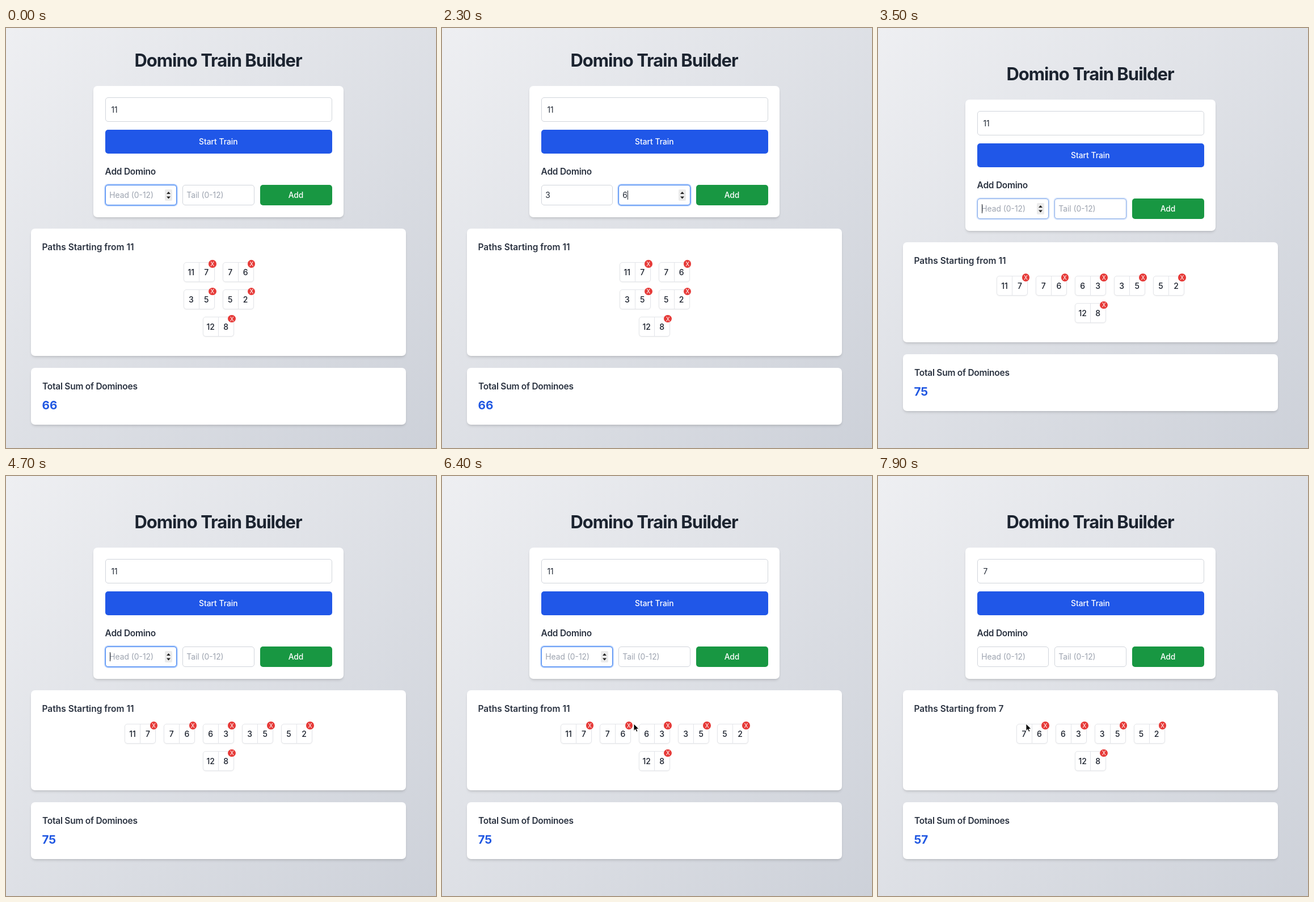
An HTML page that plays this animation: 758 px wide and 739 px high, repeating every 8 s.

```html
<!DOCTYPE html>
<html lang="en">
<head>
<meta charset="utf-8">
<title>Domino Train Builder</title>
<style>
html, body { margin: 0; width: 100%; height: 100%; overflow: hidden; }
#stage {
  position: relative; width: 758px; height: 739px; overflow: hidden;
  background: linear-gradient(to bottom right, #eeeff2, #cdd1d9);
  font: 400 13.8px Inter, "Noto Sans", sans-serif; color: #1f2733;
}
#stage div, #stage svg { position: absolute; box-sizing: border-box; }
.text { white-space: pre; line-height: 20px; }
.mid { transform: translateX(-50%); }
.title { font-size: 31px; font-weight: 700; letter-spacing: -1px; color: #1c2430; }
.head { font-size: 15.5px; font-weight: 600; color: #2a3240; }
.tight { letter-spacing: -.25px; }
.sum { font-size: 20.7px; font-weight: 700; color: #2158e2; }
.label { font-weight: 500; color: #fff; }
.hint { color: #9ca3af; }
.num { font-size: 14px; font-weight: 500; color: #1a202c; }
.x { font-size: 10.3px; color: #fff; }
.card {
  background: #fff; border-radius: 7px;
  box-shadow: 0 3.5px 5px -1px rgba(0,0,0,.1), 0 2px 3.5px -1.5px rgba(0,0,0,.1);
}
.field { background: #fff; border: 1px solid #d1d5db; border-radius: 5px; }
.blue { background: #2057e8; border-radius: 5px; }
.green { background: #189742; border-radius: 5px; }
.tile {
  background: #fff; border: 1px solid #e3e5e9; border-radius: 5px;
  box-shadow: 0 1px 2px rgba(0,0,0,.05);
}
.line { background: #e3e5e9; }
.dot { background: #e63a38; border-radius: 50%; }
.caret { background: #20242c; }
.spin { background: #ebebeb; border-radius: 2px; }
</style>
</head>
<body>
<div id="stage"></div>
<script>
const LOOP = 8000, STEP = 100;
const TAB = 1650, SUBMIT = 3420, BLUR = 7650, REMOVE = 7900;
const stage = document.getElementById('stage');

const box = (cls, x, y, w, h, css = '', inner = '') =>
  `<div class="${cls}" style="left:${x}px;top:${y}px;width:${w}px;height:${h}px;${css}">${inner}</div>`;
// y is the middle of the capital letters
const text = (cls, x, y, s) =>
  `<div class="text ${cls}" style="left:${x}px;top:${y - 10}px">${s}</div>`;
const ramp = (t, start) => Math.min(1, Math.max(0, (t - start) / 150));
const within = (t, a, b) => t >= a && t < b;

const pointerPath = [
  [5200, 709, 653], [5600, 565, 570], [6000, 441, 498],
  [6400, 338, 436], [7000, 318, 437], [7500, 261, 436]
];

function pointer(t) {
  if (t < pointerPath[0][0]) return '';
  let [, x, y] = pointerPath.at(-1);
  const i = pointerPath.findIndex(p => p[0] > t);
  if (i > 0) {
    const a = pointerPath[i - 1], b = pointerPath[i], k = (t - a[0]) / (b[0] - a[0]);
    x = a[1] + (b[1] - a[1]) * k;
    y = a[2] + (b[2] - a[2]) * k;
  }
  return `<svg style="left:${x - 2}px;top:${y - 2}px" width="16" height="20">
    <path d="M2 2V14.5L4.9 11.8L6.8 16.2L9 15.3L7.1 11H11Z" fill="#000" stroke="#fff" stroke-width=".9"/></svg>`;
}

function field(x, y, w, value, hint, focus, spinner, caret) {
  const css = `border-color:color-mix(in srgb,#3b7ff0 ${focus * 100}%,#d1d5db);` +
    `box-shadow:0 0 0 1.7px rgba(90,150,250,${focus * .5})`;
  let out = box('field', x, y, w, 36, css) +
    text(value ? '' : 'hint', x + 7.3, y + 18, value || hint);
  if (spinner) out += box('spin', x + w - 21, y + 8, 13, 20, '',
    `<svg width="13" height="20"><path d="M3 8L6.5 4L10 8ZM3 12.5L6.5 16.5L10 12.5Z" fill="#222"/></svg>`);
  if (caret) out += box('caret', x + (value ? 16 : 7.5), y + 10, 1, 16);
  return out;
}

function domino(x, y, [a, b]) {
  return box('tile', x, y, 55, 35) + box('line', x + 27, y + 1, 1, 33) +
    text('num mid', x + 13.6, y + 17.5, a) + text('num mid', x + 40.6, y + 17.5, b) +
    box('dot', x + 44.3, y - 3.7, 13.6, 13.6) + text('x mid', x + 51.1, y + 3.1, 'X');
}

function rows(y, list) {
  return list.map((row, r) => row.map((d, i) =>
    domino(374.7 - (row.length * 68.9 - 13.8) / 2 + i * 68.9, y + r * 48.2, d)
  ).join('')).join('');
}

function trains(t) {
  if (t < SUBMIT) return [[[11, 7], [7, 6]], [[3, 5], [5, 2]], [[12, 8]]];
  const main = [[7, 6], [6, 3], [3, 5], [5, 2]];
  if (t < REMOVE) main.unshift([11, 7]);
  return [main, [[12, 8]]];
}

function caretOn(t) {
  if (t < SUBMIT) return within(t, 100, 600) || within(t, 1000, 2700);
  return t < BLUR && (t - 3500) % 1000 < 500;
}

function draw(t) {
  const sent = t >= SUBMIT, dy = sent ? 24 : 0;
  const onTail = within(t, TAB, SUBMIT), onHead = !onTail && t < BLUR;
  const headFocus = t < SUBMIT ? 1 - ramp(t, TAB) : ramp(t, SUBMIT) - ramp(t, BLUR);
  const tailFocus = ramp(t, TAB) - ramp(t, SUBMIT);
  const start = t < REMOVE ? 11 : 7;
  const list = trains(t);
  const total = list.flat(2).reduce((a, b) => a + b, 0);
  const sumY = sent ? 574 : 598;
  const caret = caretOn(t);

  stage.innerHTML =
    text('title mid', 374, 57 + dy, 'Domino Train Builder') +
    box('card', 154, 101.5 + dy, 441, 231) +
    box('field', 175, 122 + dy, 400, 43) +
    text('', 185.5, 144 + dy, start) +
    box('blue', 175, 179 + dy, 400, 42) +
    text('label mid', 374.3, 200 + dy, 'Start Train') +
    text('head tight', 174.6, 253 + dy, 'Add Domino') +
    field(175, 276 + dy, 126, within(t, 1200, SUBMIT) ? '3' : '', 'Head (0-12)',
      headFocus, onHead, onHead && caret) +
    field(311, 276 + dy, 127, within(t, 2200, SUBMIT) ? '6' : '', 'Tail (0-12)',
      tailFocus, onTail, onTail && caret) +
    box('green', 448, 276 + dy, 127, 36) +
    text('label mid', 511, 294 + dy, 'Add') +
    box('card', 44, 353 + dy, 661, sent ? 176 : 224) +
    text('head', 63.5, 385.5 + dy, 'Paths Starting from ' + start) +
    rows(412 + dy, list) +
    box('card', 44, sumY, 661, 100) +
    text('head tight', 64, sumY + 32.5, 'Total Sum of Dominoes') +
    text('sum', 63.5, sumY + 66, total) +
    pointer(t);
}

let shown = -1;
const origin = performance.now();
function tick() {
  const t = Math.floor((performance.now() - origin) % LOOP / STEP) * STEP;
  if (t !== shown) draw(shown = t);
  requestAnimationFrame(tick);
}
tick();
</script>
</body>
</html>
```
